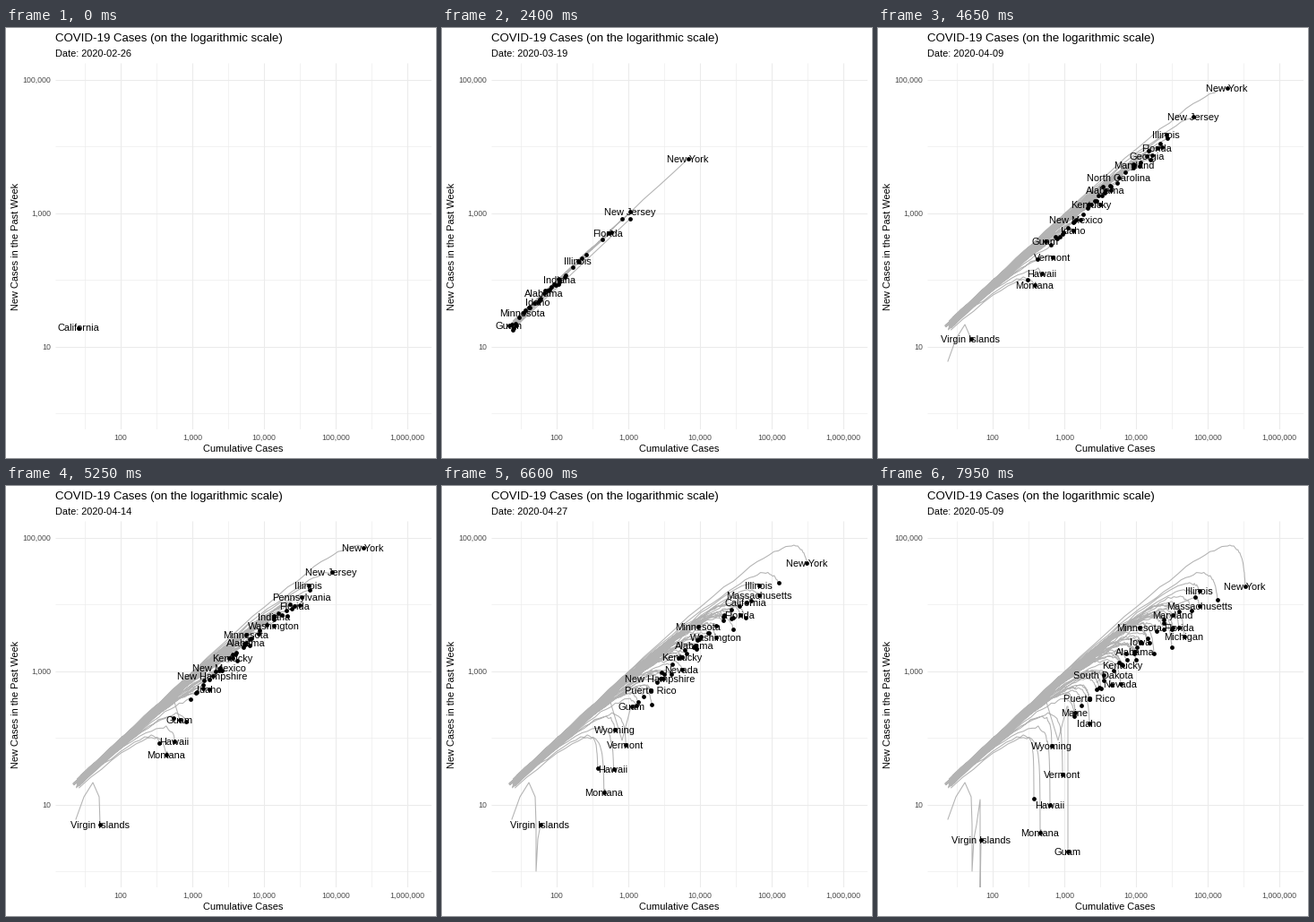
Write a matplotlib script that moves like this. It is 480 px wide and 480 px high and loops after 8000 ms.

```python
import matplotlib.pyplot as plt
import numpy as np
from matplotlib.animation import FuncAnimation
from matplotlib.textpath import TextPath

SIZE, DPI, STEPS = 480, 100, 54
PX = 72 / DPI
LEFT, RIGHT, TOP, BOTTOM = 55, 474.5, 39, 448
START_DATE = np.datetime64("2020-02-26")
DAYS_PER_STEP = 138 / 99
ORIGIN, MIDDLE, LAST = 75, 24, STEPS - 1

plt.rcParams["font.family"] = "Liberation Sans"

# x at the middle step, then x and y at the last step, in stage pixels.
# Earlier rows win the space when labels collide.
STATES = {
    "New York": (358, 410, 112), "Alabama": (208, 287, 185),
    "Florida": (274, 336, 158), "Michigan": (279, 342, 168),
    "Illinois": (268, 359, 117), "Massachusetts": (270, 359, 134),
    "New Jersey": (310, 379, 127), "Pennsylvania": (264, 350, 139),
    "Georgia": (257, 329, 158), "Maryland": (226, 329, 144),
    "Minnesota": (195, 292, 158), "Indiana": (235, 319, 153),
    "Iowa": (184, 293, 174), "Ohio": (235, 319, 160),
    "Louisiana": (266, 328, 180), "North Carolina": (222, 301, 170),
    "Kentucky": (190, 273, 200), "Utah": (204, 272, 199),
    "Idaho": (186, 236, 264), "New Mexico": (167, 263, 206),
    "Nevada": (213, 271, 221), "New Hampshire": (173, 247, 225),
    "South Dakota": (131, 252, 211), "Kansas": (179, 277, 187),
    "Puerto Rico": (158, 236, 237), "Vermont": (166, 206, 321),
    "Hawaii": (156, 192, 356), "Maine": (167, 220, 252),
    "Alaska": (136, 174, 349), "Montana": (152, 181, 386),
    "Wyoming": (135, 194, 290), "Mississippi": (205, 286, 185),
    "Arizona": (217, 289, 180), "Oregon": (195, 249, 226),
    "Missouri": (218, 288, 194), "Washington": (266, 308, 187),
}
UNLABELLED = 15

# Paths with sudden turns: (step, x, y).
IRREGULAR = {
    "Guam": [(16, 75, 332), (24, 139, 279), (31, 187, 238), (39, 201, 284),
             (41, 211, 246), (44, 212, 246), (53, 212, 408)],
    "Virgin Islands": [(22, 78, 372), (24, 87, 347), (27, 97, 331), (31, 104, 347),
                       (35, 105, 378), (37, 105, 430), (39, 107, 394), (44, 110, 378),
                       (50, 114, 350), (51, 114, 455), (53, 115, 395)],
    "California": [(0, 81, 334.5), (16, 210, 213), (24, 283, 149),
                   (39, 332, 133), (53, 354, 124)],
}


def growth_line(x):
    """Height of unchecked exponential growth, where both counts rise together."""
    return 331 - 74.5 / 80 * (x - ORIGIN)


def blank_track():
    return np.full((2, STEPS), np.nan)


def irregular_track(points):
    steps, xs, ys = np.transpose(points)
    t = np.arange(int(steps[0]), STEPS)
    track = blank_track()
    track[:, t] = np.interp(t, steps, xs), np.interp(t, steps, ys)
    return track


def epidemic_track(x_middle, x_last, final_lag, first_lag, rng):
    """Total levels off like tanh while the weekly count drops below the growth line."""
    reach = x_last - ORIGIN
    tau = min(14.5, reach / 13)
    begin = MIDDLE - tau * np.arctanh((x_middle - ORIGIN) / reach)
    t = np.arange(int(np.ceil(begin)), STEPS)
    x = ORIGIN + reach * np.tanh((t - begin) / tau) / np.tanh((LAST - begin) / tau)

    u = np.clip((t - 14) / (LAST - 14), 0, 1)
    steepness = min(final_lag / 100, 1)
    fall = (1 - steepness) * u * u * (3 - 2 * u) + steepness * u ** 1.4
    lag = final_lag * fall + first_lag * np.exp((ORIGIN - x) / 60)
    lag[:-1] += rng.normal(0, 0.8, len(t) - 1)
    track = blank_track()
    track[:, t] = x, growth_line(x) + lag
    return track


def build_tracks():
    rng = np.random.default_rng(19)
    tracks = {name: irregular_track(points) for name, points in IRREGULAR.items()}
    for name, (x_middle, x_last, y_last) in STATES.items():
        tracks[name] = epidemic_track(x_middle, x_last, y_last - growth_line(x_last),
                                      rng.uniform(0, 10), rng)
    tracks["California"] = tracks.pop("California")  # lowest label priority
    spread = np.linspace(0, 1, UNLABELLED)
    crowd = [epidemic_track(ORIGIN + (0.48 + 0.2 * s) * (144 + 117 * s), 219 + 117 * s,
                            rng.uniform(45, 66), rng.uniform(0, 10), rng)
             for s in spread]
    return list(tracks), np.array([*tracks.values(), *crowd])


NAMES, TRACKS = build_tracks()
XS, YS = TRACKS[:, 0], TRACKS[:, 1]
WIDTHS = [TextPath((0, 0), name, size=11).get_extents().width for name in NAMES]


def visible_labels(step):
    """Place labels by priority and skip any that would overlap."""
    x, y = XS[:, step], YS[:, step]
    placed = []
    for i in range(len(NAMES)):
        if not np.isnan(x[i]) and all(
                abs(x[i] - x[j]) >= (WIDTHS[i] + WIDTHS[j]) / 2
                or abs(y[i] - y[j]) >= 7.9 for j in placed):
            placed.append(i)
    return placed


fig = plt.figure(figsize=(SIZE / DPI, SIZE / DPI), dpi=DPI, facecolor="white")
ax = fig.add_axes([LEFT / SIZE, 1 - BOTTOM / SIZE,
                   (RIGHT - LEFT) / SIZE, (BOTTOM - TOP) / SIZE])
ax.set(xlim=(LEFT, RIGHT), ylim=(BOTTOM, TOP))
ax.axis("off")


def write(x, y, text, size=11, **style):
    return ax.text(x, y, text, fontsize=size * PX, **style)


def grid(xs, ys, width):
    style = dict(colors="#ebebeb", linewidths=width * PX, zorder=0)
    ax.vlines(xs, TOP, BOTTOM, **style)
    ax.hlines(ys, LEFT, RIGHT, **style)


x_major, y_major = 128 + 79.9 * np.arange(5), 57.5 + 149 * np.arange(3)
grid(x_major - 40, y_major + 74.5, 0.6)
grid(x_major, y_major, 1.07)
for i, x in enumerate(x_major):
    write(x, 460, f"{10 ** (i + 2):,}", 8.8, color="#4d4d4d", ha="center")
for i, y in enumerate(y_major):
    write(50.3, y + 3.3, f"{10 ** (5 - 2 * i):,}", 8.8, color="#4d4d4d", ha="right")
write(55, 15, "COVID-19 Cases (on the logarithmic scale)", 13.2)
write(264.7, 473, "Cumulative Cases", ha="center")
write(16.3, 243.5, "New Cases in the Past Week", rotation=90, ha="right", va="center")
date = write(55, 32, "")

trails, = ax.plot([], [], color="#b3b3b3", lw=1.07 * PX, zorder=1)
dots, = ax.plot([], [], "o", color="black", ms=4.8 * PX, mew=0, zorder=2)
labels = [write(0, 0, name, ha="center", clip_on=True, zorder=3) for name in NAMES]
GAP = np.full((len(TRACKS), 1), np.nan)


def update(frame):
    step = frame // 3
    date.set_text(f"Date: {START_DATE + int(step * DAYS_PER_STEP)}")
    trails.set_data(np.hstack([XS[:, :step + 1], GAP]).ravel(),
                    np.hstack([YS[:, :step + 1], GAP]).ravel())
    dots.set_data(XS[:, step], YS[:, step])
    shown = visible_labels(step)
    for i, label in enumerate(labels):
        label.set_visible(i in shown)
        if i in shown:
            label.set_position((XS[i, step] - 0.5, YS[i, step] + 4))
    return [date, trails, dots, *labels]


# 160 ticks of 50 ms; the picture changes on every third tick.
anim = FuncAnimation(fig, update, frames=160, interval=50, repeat=True, repeat_delay=0)
plt.show()
```
